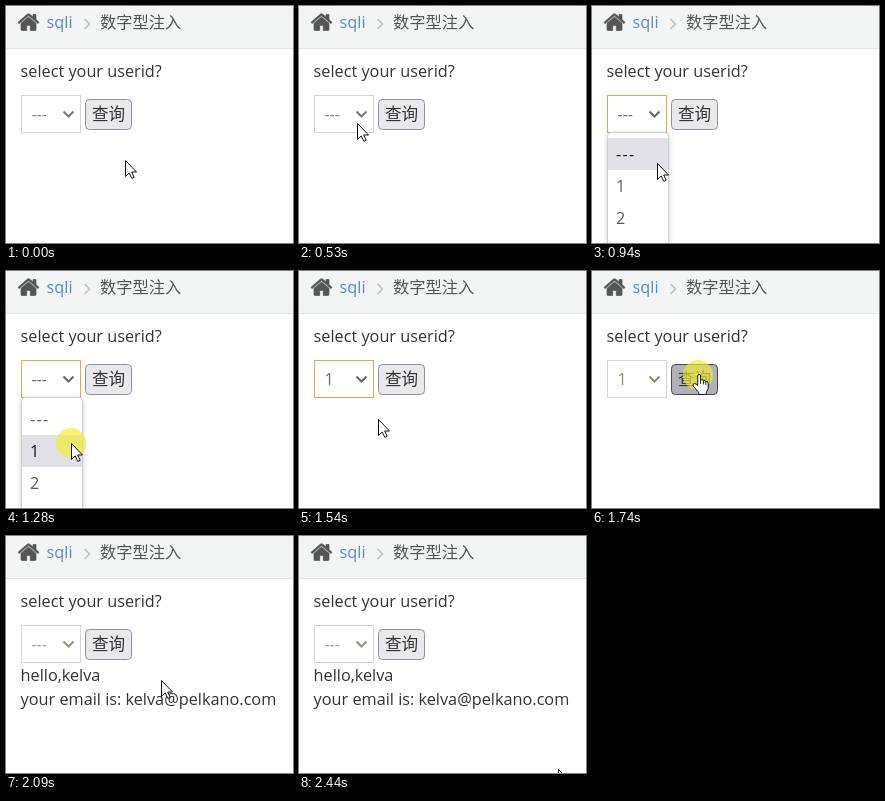
Recreate the animation shown at these times as an HTML page. Size 287 by 237 pixels, loop 2.5 s.

```html
<!DOCTYPE html>
<html lang="zh-CN">
<head>
<meta charset="utf-8">
<title>Query form</title>
<style>
  html, body { margin: 0; width: 100%; height: 100%; overflow: hidden; background: #fff; }
  svg { display: block; width: 100vw; height: 100vh; }
  text { font: 16.25px "Open Sans", "Noto Sans CJK SC", "Noto Sans CJK", sans-serif; fill: #333; }
  .line { fill: none; stroke-width: 2; }
  .off { visibility: hidden; }
  #field { fill: #fff; stroke: #d5d5d5; }
  #value { fill: #858585; }
  #arrow { stroke: #777; }
  .focus #field { stroke: #f0a04b; }
  .focus #value { fill: #696969; }
  .focus #arrow { stroke: #666; }
  .blur #value { fill: #918b7c; }
  .blur #arrow { stroke: #8c866f; }
  .fresh #value { fill: #a5a08e; }
  .fresh #arrow { stroke: #969078; }
  #button rect { fill: #e9e9ed; stroke: #8f8f9d; }
  #button text { font-size: 16.6px; fill: #333; }
  #button.hover rect { fill: #d0d0d7; stroke: #676774; }
  #button.down rect { fill: #b1b1b9; stroke: #484851; }
  #menu { filter: drop-shadow(0 1px 2px rgba(0, 0, 0, .22)); }
  #menu text { fill: #5f5b58; }
  #menu text.on { fill: #15141a; }
  #pulse { fill: #f3ed28; fill-opacity: .65; }
  .pointer { fill: #fff; stroke: #111; stroke-linejoin: round; }
</style>
</head>
<body>
<svg viewBox="0 0 287 237">
  <rect width="287" height="42" fill="#f3f5f5"/>
  <rect y="42" width="287" height="1" fill="#e2e5e5"/>
  <g fill="#555" stroke="#555" stroke-width=".7">
    <path d="M12 16.3 21.2 8.2Q22.5 7.2 23.8 8.2L27 11V8.5H30V13.6L33 16.3 32 17.6 22.5 9.6 13 17.6Z"/>
    <path d="M15 17.2 22.5 11 30 17.2V23.5Q30 24.5 29 24.5H24.3V19.4H20.7V24.5H16Q15 24.5 15 23.5Z"/>
  </g>
  <text x="40.6" y="22" style="fill:#568cc0">sqli</text>
  <path class="line" d="M78.5 13 83.5 18 78.5 23" stroke="#b9c4c9" style="stroke-width:1.6"/>
  <text x="94" y="22" style="fill:#555">数字型注入</text>
  <text x="14.6" y="71">select your userid?</text>

  <g id="select">
    <rect id="field" x="15.5" y="89.5" width="59" height="37"/>
    <text id="value" x="25.4" y="114">---</text>
    <path id="arrow" class="line" d="M57.5 105.5 62.5 110.5 67.5 105.5"/>
  </g>
  <g id="button">
    <rect x="79.5" y="93.5" width="46" height="30" rx="4"/>
    <text x="86" y="114">查询</text>
  </g>
  <g id="result">
    <text x="14.6" y="145">hello,kelva</text>
    <text x="14.6" y="169">your email is: kelva@pelkano.com</text>
  </g>
  <g id="menu">
    <rect x="15.5" y="126.5" width="61" height="130" rx="4" fill="#fff" stroke="#cfcfd8"/>
    <rect id="row" x="16" width="60" height="32" fill="#e0e0e6"/>
    <text x="24" y="153.5" letter-spacing="1.3">---</text>
    <text x="24" y="186">1</text>
    <text x="24" y="218">2</text>
  </g>
  <g id="mouse">
    <circle id="pulse" r="15"/>
    <path id="tip" class="pointer" d="M.5.5V16.5L4.2 13 6.8 18.4 9.2 17.3 6.7 12H11.5Z"/>
    <path id="hand" class="pointer" transform="translate(-5.5 -1) scale(.95)"
      d="M5.5 12V2Q5.5.5 7 .5T8.5 2V6.5Q10 4.9 11.5 7 13 5.7 14 8 16.5 7 16.5 10V14Q16.5 17 14.5 19V21.5H6.5V19.5L.8 12.6Q-.1 10.4 2 10 3.8 10 5.5 12ZM8.5 6.5V10.5M11.5 7V11M14 8V11.5"/>
  </g>
</svg>
<script>
  const LOOP = 2500;
  const $ = id => document.getElementById(id);
  const items = document.querySelectorAll('#menu text');

  const linear = p => p;
  const smooth = p => p * p * (3 - 2 * p);
  const START = [119, 154];
  // The pointer is sampled in discrete steps, the last one landing at `end`.
  const moves = [
    { start: 70, end: 530, steps: 8, to: [58, 117], ease: smooth },
    { start: 800, end: 940, steps: 3, to: [65, 157], ease: linear },
    { start: 1010, end: 1150, steps: 3, to: [65, 172], ease: linear },
    { start: 1410, end: 1680, steps: 5, to: [106, 104], ease: smooth },
    { start: 2010, end: 2300, steps: 5, to: [244, 218], ease: smooth },
    { start: 2410, end: 2440, steps: 2, to: [259, 233], ease: linear }
  ];

  function pointerAt(t) {
    let pos = START;
    for (const { start, end, steps, to, ease } of moves) {
      if (t < start) break;
      const step = t >= end ? steps : 1 + Math.floor((t - start) / (end - start) * (steps - 1));
      const p = ease(step / steps);
      pos = pos.map((v, i) => Math.round(v + (to[i] - v) * p));
    }
    return pos;
  }

  const show = (id, on) => $(id).classList.toggle('off', !on);

  function draw(t) {
    const within = (a, b) => t >= a && t < b;
    const [x, y] = pointerAt(t);
    const overButton = x >= 79 && x < 126 && y >= 93 && y < 124;
    const pressed = within(1740, 1870);
    const loaded = t >= 1940;
    const active = y >= 164 ? 1 : 0;

    $('mouse').setAttribute('transform', `translate(${x} ${y})`);
    show('tip', !overButton);
    show('hand', overButton);
    show('pulse', within(670, 740) || within(1280, 1350) || pressed);

    show('menu', within(740, 1350));
    $('row').setAttribute('y', 132 + 32 * active);
    items.forEach((item, i) => item.classList.toggle('on', i === active));

    $('value').textContent = within(1350, 1940) ? '1' : '---';
    $('select').setAttribute('class',
      within(670, 1740) ? 'focus' : loaded ? 'fresh' : t >= 1740 ? 'blur' : '');
    $('button').setAttribute('class', pressed ? 'down' : overButton && !loaded ? 'hover' : '');
    show('result', loaded);
  }

  const began = performance.now();
  function tick() {
    draw((performance.now() - began) % LOOP);
    requestAnimationFrame(tick);
  }
  tick();
</script>
</body>
</html>
```
